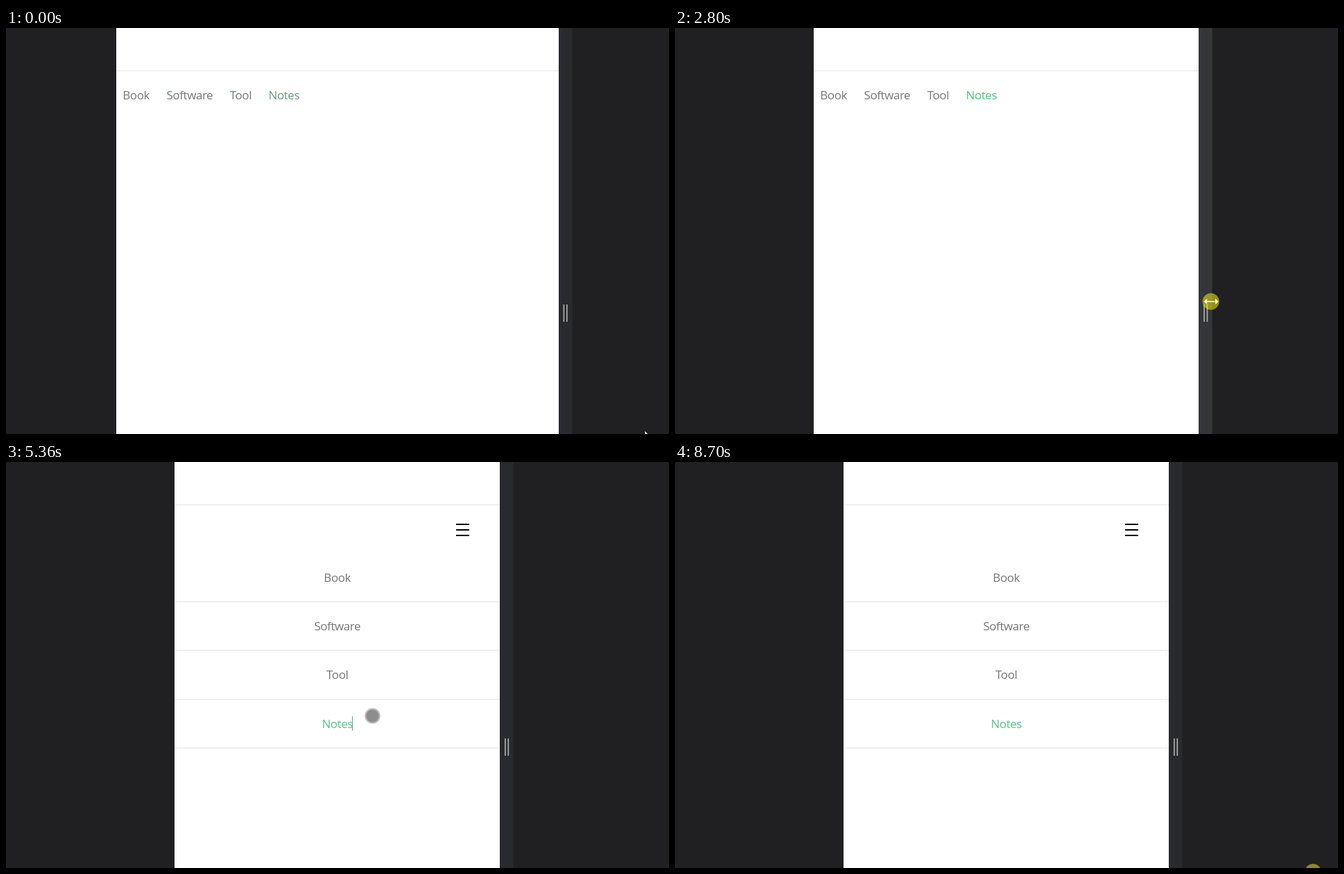
An HTML page with a canvas for the animation above (8.77 s loop, 956 by 586 pixels).

```html
<!DOCTYPE html>
<html lang="en">
<head>
<meta charset="utf-8">
<title>Responsive menu</title>
<style>
html, body { margin: 0; width: 100%; height: 100%; overflow: hidden; background: #202022; }
canvas { display: block; }
</style>
</head>
<body>
<canvas id="stage" width="956" height="586"></canvas>
<script>
const ctx = document.getElementById('stage').getContext('2d');
const W = 956, H = 586, LOOP = 8770;
const LABELS = ['Book', 'Software', 'Tool', 'Notes'];
const WIDE = 797, NARROW = 712.5, BREAKPOINT = 530;
const ROW = 70.4;
const DRAG_START = 1800, DRAG_END = 3690, MENU_OPEN = 4430;

// Pointer strokes: start, end, then Bezier points after the previous stop
const HOME = [921, 581];
const STROKES = [
  { from: 0, to: 870, path: [[819, 400]] },
  { from: 900, to: 1000, path: [[814, 399]] },
  { from: DRAG_START, to: DRAG_END, path: [[729.5, 394]] },
  { from: 3750, to: 4350, path: [[690, 330], [659, 106]] },
  { from: 4660, to: 5560, path: [[640, 310], [494, 388]] },
  { from: 5600, to: 5960, path: [[461, 470]] },
  { from: 6080, to: 6970, path: [[370, 300], [690, 270], [481, 258]] },
  { from: 7000, to: 7900, path: [[680, 258], [860, -325], [917, 474]] },
  { from: 7910, to: 8040, path: [[910, 592]] },
  { from: 8300, to: 8600, path: [[920, 592]] }
];

const clamp = u => Math.min(1, Math.max(0, u));
const smooth = u => u * u * (3 - 2 * u);
const mix = (a, b, u) => a + (b - a) * u;

function bezier(points, u) {
  if (points.length === 1) return points[0];
  const next = points.slice(1).map((p, i) => p.map((v, k) => mix(points[i][k], v, u)));
  return bezier(next, u);
}

// Slow start, quick second half
function dragEase(t) {
  const u = clamp((t - DRAG_START) / (DRAG_END - DRAG_START));
  return smooth(u - .28 * u * u * (1 - u));
}

function pointerAt(t, edge) {
  if (t >= DRAG_START && t < DRAG_END) return [edge + 17, mix(399, 394, smooth(clamp((t - 1900) / 1200)))];
  let spot = HOME;
  for (const { from, to, path } of STROKES) {
    if (t < from) break;
    spot = bezier([spot, ...path], smooth(clamp((t - from) / (to - from))));
  }
  return spot;
}

function rect(color, x, y, w, h) {
  ctx.fillStyle = color;
  ctx.fillRect(x, y, w, h);
}

function disc(color, x, y, r) {
  ctx.fillStyle = color;
  ctx.beginPath();
  ctx.arc(x, y, r, 0, Math.PI * 2);
  ctx.fill();
}

function label(text, x, y, color, align) {
  ctx.fillStyle = color;
  ctx.textAlign = align;
  ctx.fillText(text, x, y);
}

function shape(color, x, y, points) {
  ctx.fillStyle = color;
  ctx.beginPath();
  for (const [dx, dy] of points) ctx.lineTo(x + dx, y + dy);
  ctx.closePath();
  ctx.fill();
}

function arrow(x, y) {
  shape('#fff', x, y, [[0, 0], [0, 25], [6, 19.5], [10, 28], [14, 26.5], [10.5, 18], [18, 18]]);
  ctx.strokeStyle = '#000';
  ctx.lineWidth = .8;
  ctx.stroke();
}

function resizeCursor(x, y, pressed) {
  if (pressed) disc('rgba(255,245,20,.52)', x, y, 12);
  const color = pressed ? '#fffbd0' : '#fff';
  rect(color, x - 8, y - .75, 17, 1.5);
  for (const side of [-1, 1]) {
    shape(color, x + .5, y, [[side * 10.5, 0], [side * 6, -4.2], [side * 6, 4.2]]);
  }
}

function touchCursor(x, y) {
  disc('rgba(0,0,0,.26)', x, y, 11.3);
  disc('rgba(0,0,0,.25)', x, y, 9.3);
}

function drawNav(left, t) {
  const green = t < DRAG_START ? '#67987b' : t < 2400 ? '#4da46c' : '#4cc47a';
  let x = left + 9.3;
  for (const text of LABELS) {
    label(text, x, 103, text === 'Notes' ? green : '#727a72', 'left');
    x += ctx.measureText(text).width + 24.6;
  }
}

function drawBurger(right, t) {
  if (t >= 4400 && t < 4550) rect('#f5fbff', right - 65, 63, 26, 69);
  for (let i = 0; i < 3; i++) rect('#000', right - 63, 89 + i * 8, 19, 2);
}

function drawList(left, width, t) {
  LABELS.forEach((text, i) => {
    label(text, W / 2 - .3, 172.5 + i * ROW, text === 'Notes' ? '#57c283' : '#757575', 'center');
    rect('#ebebeb', left, 201 + Math.round(i * ROW), width, 1.5);
  });
  const blink = Math.floor((t - 8285) / 415);
  if (blink % 2 === 0) rect('#57b07c', 499, 367, 1, 21);
}

function drawPointer([x, y], edge, t) {
  if (t < 1000) arrow(x, y);
  else if (t < 3820) resizeCursor(x, y, t >= 1610 && t < 3750);
  else if (t >= 8700) disc('#8f8b1c', x, y, 12);
  else if (x < edge) touchCursor(x, y);
  else arrow(x, y);
}

function draw(t) {
  const edge = mix(WIDE, NARROW, dragEase(t));
  const right = Math.floor(edge), left = Math.round(W - .5 - edge);
  const width = right - left;
  const dragging = t >= DRAG_START && t < DRAG_END;
  rect('#202022', 0, 0, W, H);
  rect('#fff', left, 0, width, H);
  rect(dragging ? '#35363a' : '#292a2e', right, 0, 19.5, H);
  for (const dx of [6.6, 11]) rect('#b4b4ae', edge + dx, 399, 1.6, 25);
  rect('#ebebeb', left, 61, width, 1.5);

  ctx.font = '17px "Open Sans", "Noto Sans", sans-serif';
  ctx.letterSpacing = '-0.45px';
  if (width > BREAKPOINT) drawNav(left, t);
  else drawBurger(right, t);
  if (t >= MENU_OPEN) drawList(left, width, t);
  drawPointer(pointerAt(t, edge), right, t);
}

const start = performance.now();
function frame() {
  draw((performance.now() - start) % LOOP);
  requestAnimationFrame(frame);
}
frame();
</script>
</body>
</html>
```
